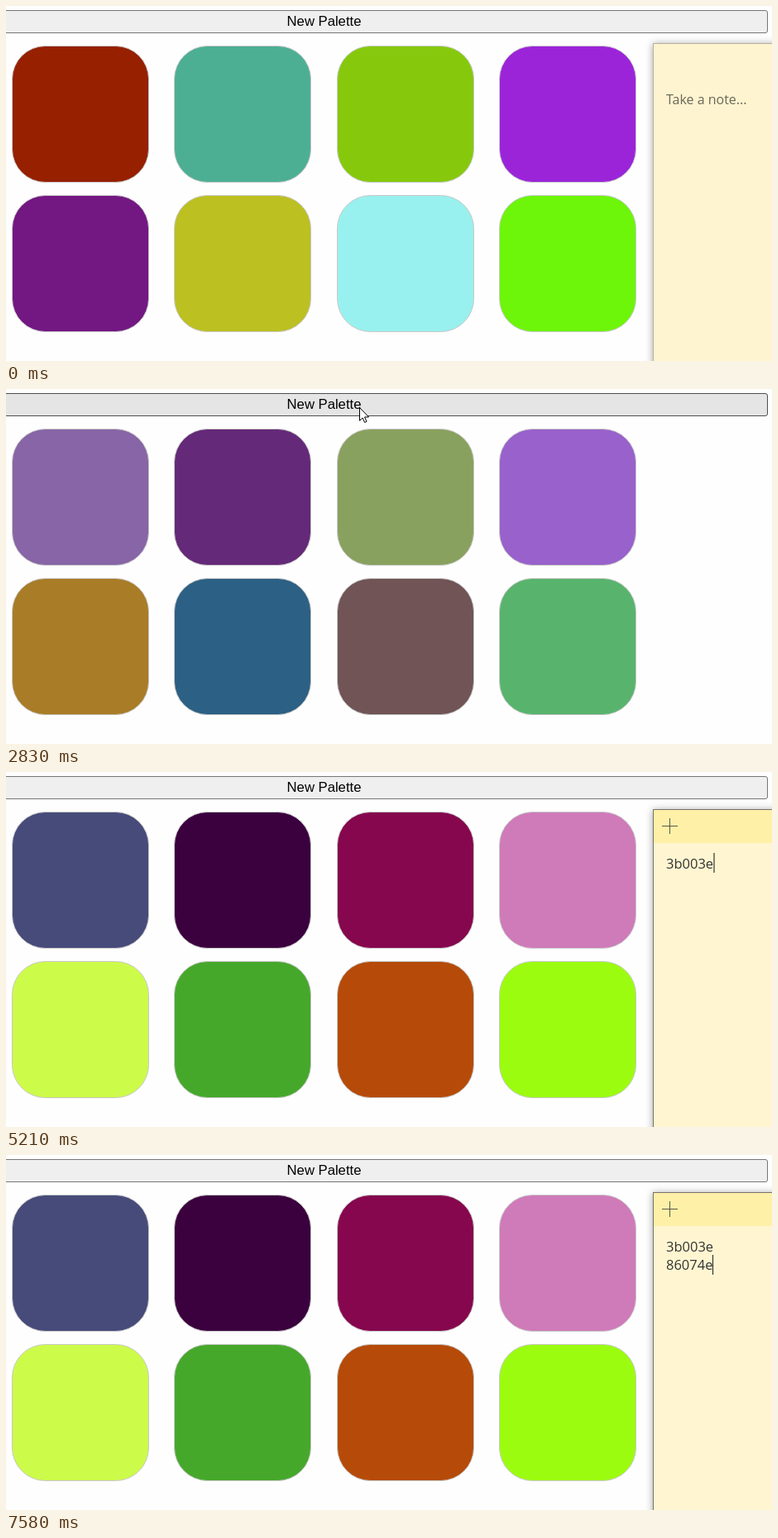
Write an HTML page that moves like this. It is 926x430 px and loops after 8000 ms.

```html
<!DOCTYPE html>
<html lang="en">
<head>
<meta charset="utf-8">
<title>Colour palette</title>
<style>
  html, body { margin: 0; width: 100%; height: 100%; overflow: hidden; background: #fefefe; }
  svg { display: block; width: 926px; height: 430px; }
  text { white-space: pre; }
  .label { font: 16.667px "Liberation Sans", Arial, sans-serif; }
  .toast { font: 25px "Liberation Serif", "Times New Roman", serif; fill: #fff; }
  .note { font: 16.5px "Open Sans", "Noto Sans", sans-serif; fill: #333; }
  .hint { font-size: 16px; fill: #6c675a; }
  #note { filter: drop-shadow(0 1px 5px rgba(0, 0, 0, .36)); }
</style>
</head>
<body>
<svg viewBox="0 0 926 430">
  <rect id="button" x="-10" y="5.5" width="930.5" height="27" rx="2.5"/>
  <text class="label" x="384.5" y="24" text-anchor="middle">New Palette</text>
  <g id="tiles" stroke="#c8c8c8"></g>
  <g id="icon" fill="none" stroke="#000" stroke-width="2.7" stroke-linejoin="round">
    <path d="M-3-12.5H5L11-6.5V4.500Q11 7.500 8 7.500H-3Q-6 7.500-6 4.500V-9.500Q-6-12.500-3-12.500Z"/>
    <path d="M-6-6.500Q-10-6.500-10-3.500V9.500Q-10 12.500-7 12.500H3Q6 12.500 6 9.500V8"/>
  </g>
  <g id="toast">
    <rect x="260" y="33" width="250" height="50" rx="19" fill="#000" fill-opacity=".63"/>
    <text class="toast" x="340.500" y="66">copied :)</text>
  </g>
  <g id="note">
    <rect id="paper" x="782.500" y="45.500" width="160" height="400"/>
    <g id="head">
      <rect x="783" y="46" width="150" height="40" fill="#fff0a8"/>
      <path d="M793 65.500H812M802.500 56V75" stroke="#5b5748"/>
    </g>
    <text class="note hint" id="hint" x="798" y="119">Take a note...</text>
    <text class="note" id="line1" x="798" y="117">3b003e</text>
    <text class="note" id="line2" x="798" y="139">86074e</text>
    <path id="caret" d="M0 0V24" stroke="#333" stroke-width="1.200"/>
  </g>
  <g id="cursor" fill="#fff" stroke="#000" stroke-linejoin="round">
    <path id="arrow" d="M.5.5V16.300L4.100 13 6.600 18.500 9 17.400 6.500 12H11.500Z"/>
    <path id="hand" d="M-2 2.500Q-2 .5 0 .5T2 2.500V8.500Q4.500 7 5.500 9.300 8 8 9 10.300 12 9.300 12 12V16Q12 19 10 20.500V23.500H1V21L-5.500 13.500Q-6.500 11.500-5 11-3.500 10.500-2 13Z"/>
  </g>
</svg>
<script>
const LOOP = 8000, FRAME = 70;
const $ = id => document.getElementById(id);
const hex = s => s.split(" ").map(c => [0, 2, 4].map(i => parseInt(c.substr(i, 2), 16)));
const palettes = [
  "962000 4caf93 86c90c 9b24d9 731782 bdc021 98f1ee 6df50a",
  "a872bd 793e96 8af166 7c54d5 973b15 1f3bb2 4e597e 358f9d",
  "474b7a 3b003e 86074e cf7ab9 cdfb4a 46a82b b64b09 9cfc10"
].map(hex);

// Moments at which the stepped clock starts anew
const ticks = [0, 190, 1210, 1740, 1800, 1870, 2630, 2690, 3450, 3920,
  4470, 5210, 5670, 6430, 6840, 7250, 7580];

// Pointer visits: time, x, y
const visits = [
  [[190, 475, 396], [610, 430, 22], [1210, 429, 22], [1470, 427, 22], [3150, 427, 22],
   [3420, 322, 98], [3590, 315, 111], [3850, 315, 111], [4130, 903, 198], [4200, 926, 220]],
  [[5670, 912, 205], [5960, 555, 112], [6090, 524, 104], [6290, 524, 104],
   [6430, 690, 108], [6500, 878, 133], [6570, 926, 145]]
];

const SIZE = 165;
const tiles = palettes[0].map((_, i) => {
  const x = Math.round((i % 4) * 196.4) + 7.5, y = i < 4 ? 48.5 : 229.5;
  const el = document.createElementNS("http://www.w3.org/2000/svg", "rect");
  for (const [k, v] of Object.entries({ x, y, width: SIZE, height: SIZE, rx: 40 })) el.setAttribute(k, v);
  $("tiles").append(el);
  return { el, x, y };
});

const clamp = x => Math.min(1, Math.max(0, x));
const mix = (a, b, p) => a + (b - a) * p;
const within = (t, a, b) => t >= a && t < b;
const show = (id, on) => $(id).setAttribute("visibility", on ? "inherit" : "hidden");
const place = (id, x, y) => $(id).setAttribute("transform", `translate(${x} ${y})`);

// cubic-bezier(.25, .1, .25, 1)
function ease(x) {
  if (x <= 0 || x >= 1) return clamp(x);
  const bez = (u, a, b) => 3 * u * (1 - u) ** 2 * a + 3 * u * u * (1 - u) * b + u ** 3;
  let lo = 0, hi = 1;
  for (let i = 0; i < 24; i++) {
    const u = (lo + hi) / 2;
    if (bez(u, .25, .25) < x) lo = u; else hi = u;
  }
  return bez(lo, .1, 1);
}

function stepped(t) {
  const start = ticks.filter(a => a <= t).pop();
  return start + Math.floor((t - start) / FRAME) * FRAME;
}

function pointerAt(t) {
  const path = visits.find(v => within(t, v[0][0], v[v.length - 1][0]));
  if (!path) return null;
  const i = path.findIndex(k => k[0] > t), a = path[i - 1], b = path[i];
  const u = (t - a[0]) / (b[0] - a[0]), p = u * u * (3 - 2 * u);
  return { x: mix(a[1], b[1], p), y: mix(a[2], b[2], p) };
}

function drawTiles(t) {
  const step = t < 2720 ? 0 : 1;
  const p = ease((t - [1837, 2720][step]) / 500);
  tiles.forEach(({ el }, i) => {
    const rgb = palettes[step][i].map((c, k) => Math.round(mix(c, palettes[step + 1][i][k], p)));
    el.setAttribute("fill", `rgb(${rgb})`);
  });
}

function drawPointer(t) {
  const m = pointerAt(t);
  const onButton = m && m.y > 5 && m.y < 33 && m.x < 921;
  const tile = m && tiles.find(({ x, y }) => within(m.x, x, x + SIZE) && within(m.y, y, y + SIZE));
  show("cursor", m);
  show("arrow", !tile);
  show("hand", tile);
  show("icon", tile);
  if (m) place("cursor", Math.round(m.x), Math.round(m.y));
  if (tile) place("icon", tile.x + SIZE / 2 + .5, tile.y + SIZE / 2 + .5);

  const pressed = within(t, 1740, 1837) || within(t, 2630, 2720);
  const [fill, line] = pressed ? ["#f5f5f5", "#8d8d8d"]
    : onButton ? ["#e5e5e5", "#4f4f4f"] : ["#efefef", "#767676"];
  $("button").setAttribute("fill", fill);
  $("button").setAttribute("stroke", line);
}

function drawNote(t) {
  const active = t >= 1740;
  const opened = t < 6230 ? 4470 : 6840;
  const shown = t < 1740 || within(t, 4470, 6230) || t >= 6840;
  show("note", shown);
  $("note").setAttribute("opacity", active ? clamp((t - opened + 70) / 210) : 1);
  $("paper").setAttribute("fill", active ? "#fff6d1" : "#fef4d0");
  $("paper").setAttribute("stroke", active ? "#77736a" : "#b5b0a0");
  show("head", active);
  show("hint", t < 5210);
  show("line1", t >= 5210);
  show("line2", t >= 7580);
  show("caret", active);
  const [x, y] = t < 5210 ? [798.5, 98] : t < 7250 ? [856, 98] : t < 7580 ? [798.5, 121] : [854.5, 121];
  place("caret", x, y);
}

function draw(time) {
  const t = stepped(time % LOOP);
  drawTiles(t);
  drawPointer(t);
  drawNote(t);
  show("toast", within(t, 3520, 4540) || within(t, 6230, 7250));
}

const begin = performance.now();
function loop() {
  draw(performance.now() - begin);
  requestAnimationFrame(loop);
}
loop();
</script>
</body>
</html>
```
